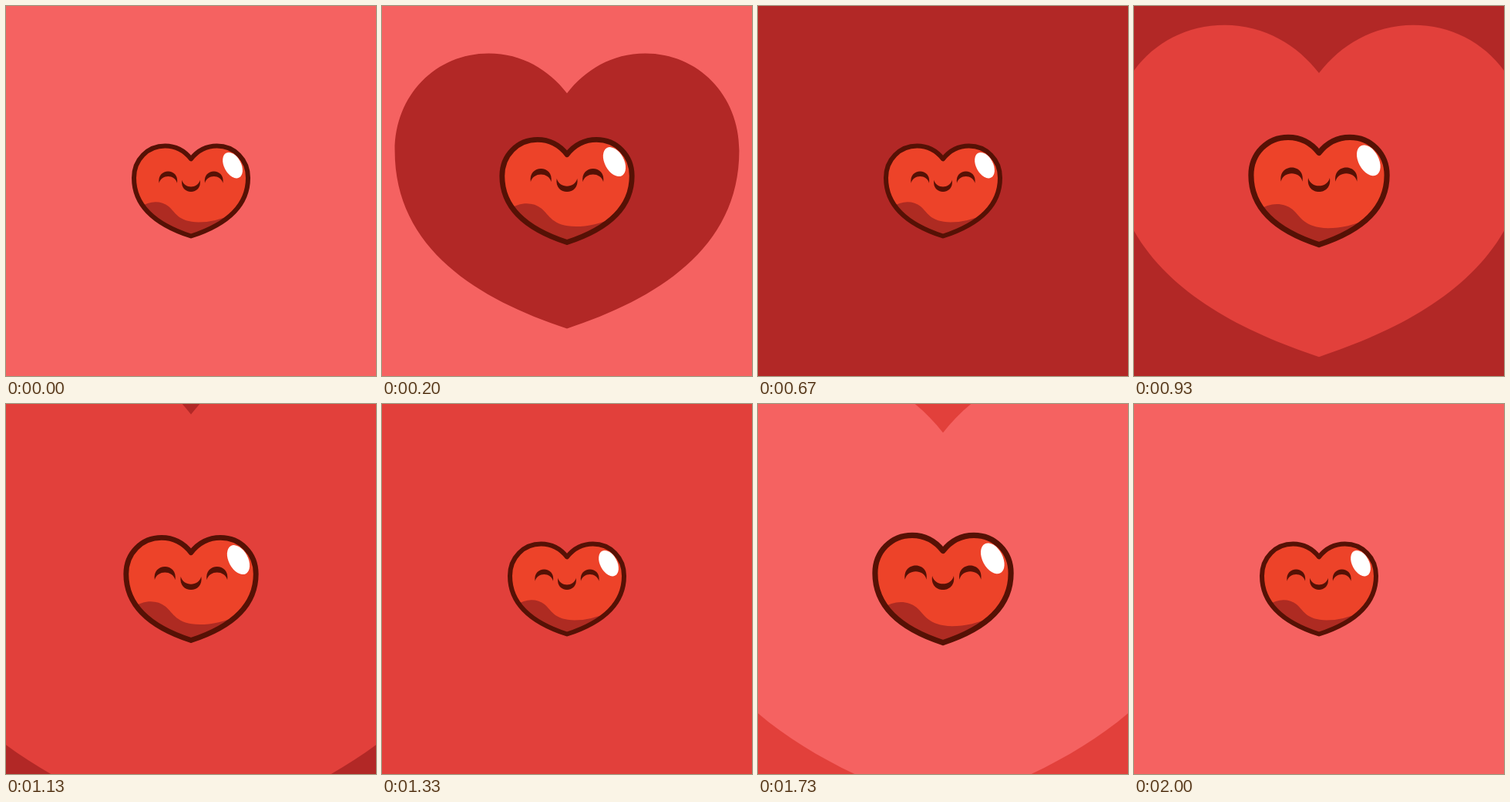
Recreate the animation shown at these times as an HTML page with a canvas. Size 480 by 480 pixels, loop 2070 ms.

```html
<!DOCTYPE html>
<html lang="en">
<head>
<meta charset="utf-8">
<title>Beating heart</title>
<style>
  html, body { margin: 0; width: 100%; height: 100%; overflow: hidden; background: #f56261; }
  canvas { display: block; width: 480px; height: 480px; }
</style>
</head>
<body>
<canvas id="stage" width="480" height="480"></canvas>
<script>
const ctx = document.getElementById('stage').getContext('2d');
const LOOP = 2070, STEP = 1000 / 15, BEAT = 10;
const BACKS = ['#f56261', '#b22826', '#e2403b'];
const LINE = '#561105';

// Heart silhouette centred on 0,0
const silhouette = new Path2D(
  'M0 -43.7 C-8 -54 -20 -61.5 -35 -61.5 C-58.5 -61.5 -77 -43 -77 -18' +
  'C-77 26 -39.5 48.5 0 61.5 C39.5 48.5 77 26 77 -18' +
  'C77 -43 58.5 -61.5 35 -61.5 C20 -61.5 8 -54 0 -43.7 Z');

// Slightly smaller, so that a 6px stroke ends on the silhouette
const body = new Path2D();
body.addPath(silhouette, new DOMMatrix([0.961, 0, 0, 0.951, 0, 0]));

const shade = new Path2D(
  'M-66 21 C-54 12.5 -39 12 -29 20 C-20 27.5 -17 40 10 40.5' +
  'C24 40.5 38 37.5 56 29 L56 70 L-80 70 L-80 21 Z');

function crescent(x, y, dir) {
  ctx.save();
  ctx.translate(x, y);
  ctx.scale(1, dir);
  ctx.beginPath();
  ctx.moveTo(-11.7, 0);
  ctx.bezierCurveTo(-15, 20.3, 15, 20.3, 11.7, 0);
  ctx.bezierCurveTo(9, 11.6, -9, 11.6, -11.7, 0);
  ctx.fill();
  ctx.restore();
}

function drawHeart() {
  ctx.fillStyle = '#ed4329';
  ctx.fill(body);
  ctx.save();
  ctx.clip(body);
  ctx.fillStyle = '#ae2b22';
  ctx.fill(shade);
  ctx.restore();

  ctx.strokeStyle = LINE;
  ctx.lineWidth = 6;
  ctx.lineJoin = 'round';
  ctx.stroke(body);

  ctx.fillStyle = LINE;
  crescent(-29.7, -10.3, -1);
  crescent(29.7, -10.3, -1);
  crescent(0, -14.3, 1);

  ctx.fillStyle = '#fff';
  ctx.beginPath();
  ctx.ellipse(54, -33.3, 11, 18, -28 * Math.PI / 180, 0, 2 * Math.PI);
  ctx.fill();
}

function scaled(k, draw) {
  ctx.save();
  ctx.translate(240, 240);
  ctx.scale(k, k);
  draw();
  ctx.restore();
}

const smooth = u => u * u * (3 - 2 * u);

function render(ms) {
  const tick = Math.min(30, Math.floor((ms + 3.5) / STEP));
  const beat = Math.floor(tick / BEAT);
  const t = (tick % BEAT) / BEAT;

  ctx.fillStyle = BACKS[beat % 3];
  ctx.fillRect(0, 0, 480, 480);

  if (t > 0) {
    const wave = 1 + 5.7 * (t + 0.16 * t * (1 - t));
    scaled(wave, () => {
      ctx.fillStyle = BACKS[(beat + 1) % 3];
      ctx.fill(silhouette);
    });
  }

  const swell = smooth(1 - Math.abs(2 * t - 1));
  scaled(1 + 0.213 * swell, drawHeart);
}

const start = performance.now();
function loop() {
  render((performance.now() - start) % LOOP);
  requestAnimationFrame(loop);
}
loop();
</script>
</body>
</html>
```
